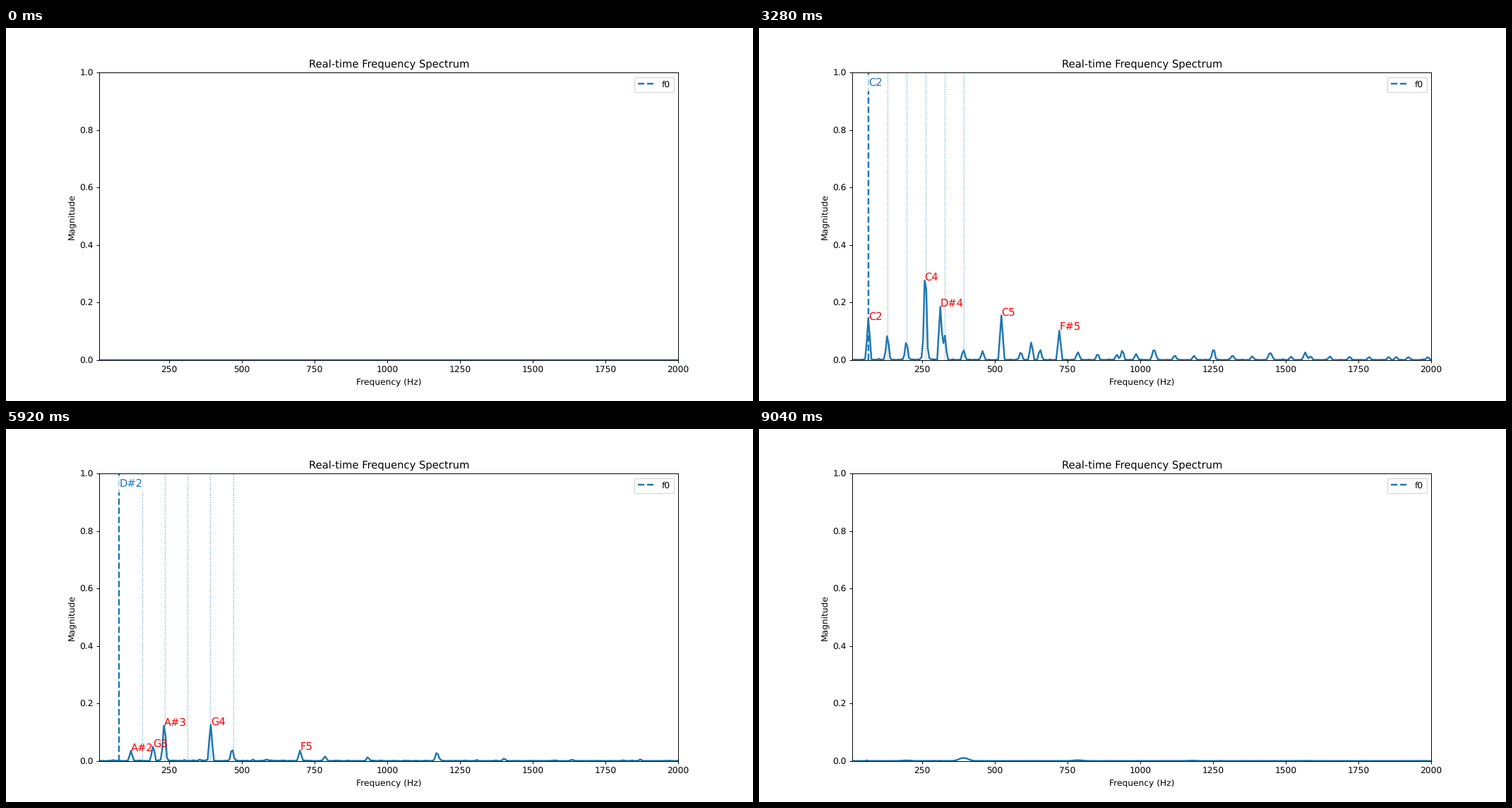
Write a matplotlib script that moves like this. It is 1058 px wide and 529 px high and loops after 9.07 s.

```python
import numpy as np
import matplotlib.pyplot as plt
from matplotlib.animation import FuncAnimation

plt.rcParams["text.hinting"] = "none"

W, H = 1058, 529
LOOP_MS, STEP_MS, START_MS = 9070, 30, 850
FRAMES = 302
LEAD = START_MS // STEP_MS
END_MS = 8920
FILL_STEPS = 7          # steps until a new sound fills the analysis window
BIN_HZ = 44100 / 8192
BINS = np.arange(381)
STRETCH = .0006         # overtones run slightly sharp
SHARPNESS = .0145       # how far a peak must rise above its neighbours
BLUE = "C0"
NAMES = ["C", "C#", "D", "D#", "E", "F", "F#", "G", "G#", "A", "A#", "B"]

# Each chord: fundamental in Hz and voices as (bin, height, overtone falloff).
E_FLAT = 77.8, [(14.46, .08, .7), (86.495, .338, 9), (160, .1, 6),
                (173.52, .125, 2), (261, .086, 6)]
C_MINOR = 65.4, [(12.1, .14, .8), (48.4, .23, 3), (58, .183, 1.6),
                 (60.9, .045, 2), (97, .1, 2), (134, .08, 2)]
B_FLAT = 93.3, [(10.75, .034, .6), (21.9, .034, 3), (32.3, .095, 2.2),
                (76, .046, 3), (86.5, .176, 2.2)]
E_FLAT_HIGH = 78.3, [(22, .033, 2), (36.2, .05, 2.5), (43.25, .115, 1.7),
                     (72.95, .118, 3), (130, .017, 3), (217.5, .018, 3)]
B_FLAT_HIGH = 116.6, [(21.95, .049, 1.5), (32.5, .029, 2.5),
                      (43.05, .148, 2.3), (54.5, .032, 3), (86, .03, 3),
                      (130, .04, 2), (217, .035, 3)]
G_TONE = 98.0, [(36.4, .02, 2), (72.8, .128, 2)]

# Onset ms, chord, ms at which the heights above hold, decay ms.
EVENTS = [
    (850, E_FLAT, 1570, 536),
    (1930, B_FLAT_HIGH, 2400, 600),
    (2620, C_MINOR, 3280, 700),
    (3560, E_FLAT_HIGH, 3900, 600),
    (4300, B_FLAT, 4720, 600),
    (5350, E_FLAT_HIGH, 5920, 700),
    (6290, B_FLAT, 6700, 600),
    (7150, B_FLAT_HIGH, 7780, 700),
    (8170, G_TONE, 9000, 900),
]
ENDS = [event[0] for event in EVENTS[1:]] + [END_MS]


def hann_lobe(d):
    d = np.where(np.abs(np.abs(d) - 1) < 1e-6, d + 1e-5, d)
    return np.abs(np.sinc(d) / (1 - d * d))


def voice_spectrum(pos, height, falloff, width):
    n = np.arange(1, int(BINS[-1] / pos) + 1)[:, None]
    centres = n * pos * (1 + STRETCH * (n - 1))
    lobes = hann_lobe((BINS - centres) / width)
    lobes /= lobes.max(axis=1, keepdims=True)
    return (height * n ** -float(falloff) * lobes).sum(axis=0)


def fill_at(t, onset):
    return float(np.clip(((t - onset) // STEP_MS + 1) / FILL_STEPS, 0, 1))


def spectrum_at(t):
    total, f0 = np.zeros(len(BINS)), None
    for (onset, (base, voices), ref, tau), end in zip(EVENTS, ENDS):
        fill = fill_at(t, onset) * (1 - fill_at(t, end))
        if fill > 0:
            level = np.exp((ref - t) / tau) * fill ** 2
            width = min(1 / fill, 4)
            total += level * sum(voice_spectrum(*v, width) for v in voices)
            f0 = base
    rng = np.random.default_rng(int(t))
    noise = rng.exponential(.0008, len(BINS)) * (.5 + np.exp(-BINS / 90))
    return total + noise * min(1, total.max() / .05), f0


def find_peaks(mag):
    rise = mag[1:-1] - np.maximum(mag[:-2], mag[2:])
    peaks = np.flatnonzero(rise > SHARPNESS) + 1
    return sorted(peaks, key=lambda p: -mag[p])[:5]


def note_name(hz):
    n = int(round(69 + 12 * np.log2(hz / 440)))
    return f"{NAMES[n % 12]}{n // 12 - 1}"


fig, ax = plt.subplots(figsize=(12, H * 12 / W), dpi=W / 12)
ax.set_xlim(10, 2000)
ax.set_ylim(0, 1)
ax.set_title("Real-time Frequency Spectrum")
ax.set_xlabel("Frequency (Hz)")
ax.set_ylabel("Magnitude")

curve, = ax.plot(BINS * BIN_HZ, np.zeros(len(BINS)), color=BLUE, lw=2)
f0_line = ax.axvline(-10, color=BLUE, ls="--", lw=2, label="f0")
overtones = [ax.axvline(-10, color=BLUE, ls=":", lw=1, alpha=.7)
             for _ in range(5)]
f0_text = ax.text(0, .955, "", color=BLUE, fontsize=12, visible=False,
                  bbox=dict(facecolor="white", alpha=.7, edgecolor="none"))
labels = [ax.text(0, 0, "", color="red", fontsize=12, visible=False)
          for _ in range(5)]
ax.legend(loc="upper right")


def update(i):
    t = START_MS + STEP_MS * (i - LEAD)
    if t < START_MS:
        mag, f0 = np.zeros(len(BINS)), None
    else:
        mag, f0 = spectrum_at(t)
    curve.set_ydata(mag)

    voiced = f0 is not None and mag.max() > .03
    for n, line in enumerate([f0_line] + overtones, start=1):
        x = n * f0 if voiced else -10
        line.set_xdata([x, x])
    f0_text.set_visible(voiced)
    if voiced:
        f0_text.set_x(f0)
        f0_text.set_text(note_name(f0))

    peaks = find_peaks(mag) if voiced else []
    for n, label in enumerate(labels):
        label.set_visible(n < len(peaks))
        if n < len(peaks):
            hz = peaks[n] * BIN_HZ
            label.set_position((hz, mag[peaks[n]]))
            label.set_text(note_name(hz))
    return [curve, f0_line, f0_text, *overtones, *labels]


anim = FuncAnimation(fig, update, frames=FRAMES, interval=LOOP_MS / FRAMES,
                     init_func=lambda: update(0), repeat=True, repeat_delay=0,
                     blit=False)
plt.show()
```
